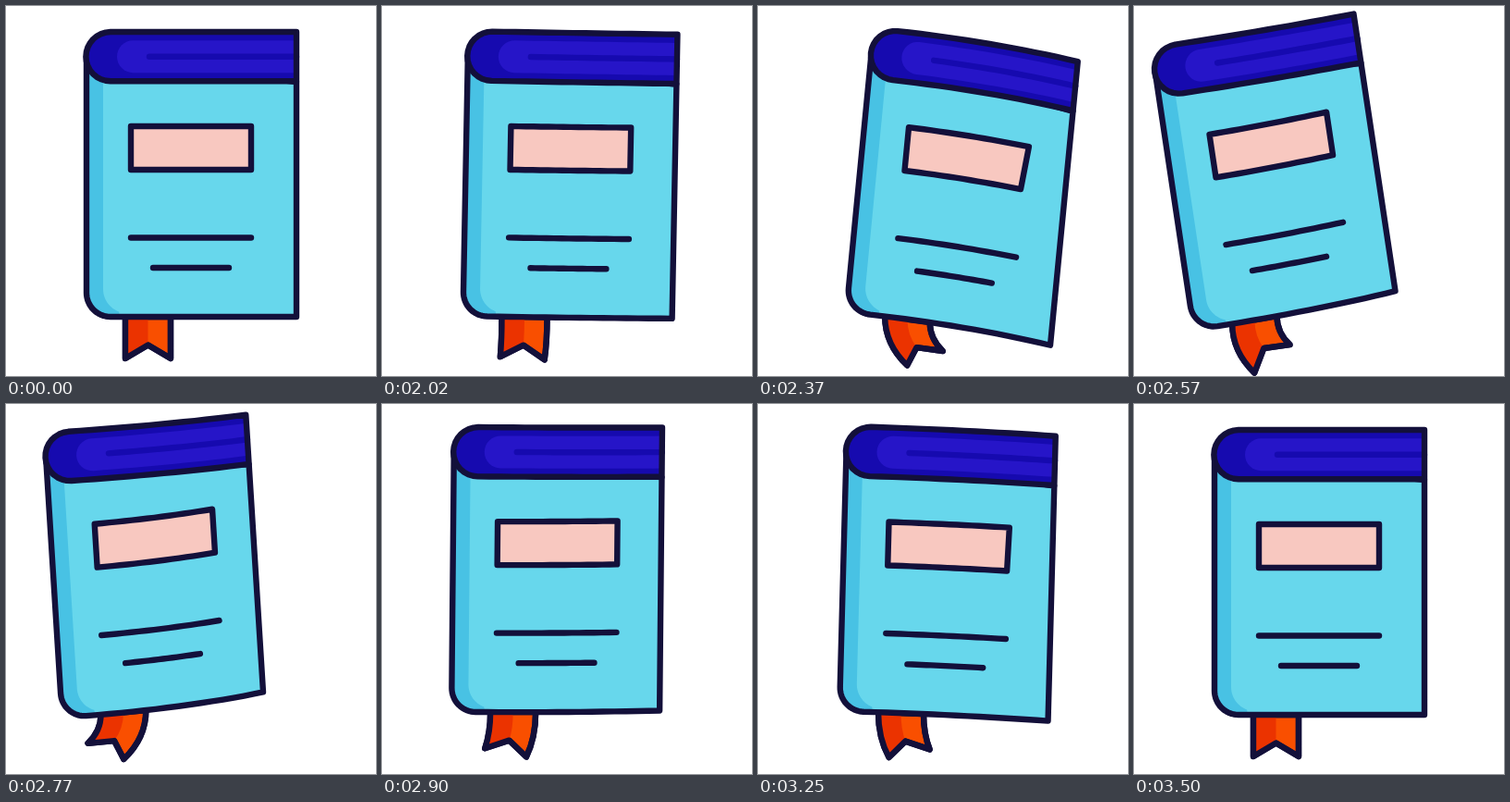
Write an HTML page with a canvas that moves like this. It is 400 by 400 pixels and loops after 3520 ms.

```html
<!DOCTYPE html>
<html lang="en">
<head>
<meta charset="utf-8">
<title>Swinging book</title>
<style>
  html, body { margin: 0; height: 100%; overflow: hidden; background: #fff; }
  canvas { display: block; width: 100vw; height: 100vh; }
</style>
</head>
<body>
<canvas id="stage" width="400" height="400"></canvas>
<script>
const ctx = document.getElementById('stage').getContext('2d');
const LOOP = 3520, START = 2020;
const INK = '#13103a';
const LEFT = 87, RIGHT = 314, WIDTH = RIGHT - LEFT, HINGE_Y = 310;

// Tracks of [time, value]; the anchor is the lower end of the left edge.
const tracks = {
  angle: [[1980, 0], [2220, 14], [2370, 5.6], [2600, -9], [2770, -3.6], [3030, 2.8], [3500, 0]],
  x: [[1980, 87], [2240, 102], [2370, 98], [2570, 61], [2660, 54], [2770, 59], [3050, 90], [3500, 87]],
  y: [[1980, 310], [2220, 298], [2370, 305], [2580, 324.5], [2770, 313], [3050, 303], [3500, 310]],
  bend: [[1980, 0], [2080, -4], [2220, 8], [2360, 14.5], [2570, -9], [2720, -14.5], [2770, -14], [3050, 8], [3500, 0]],
  flare: [[1980, 0], [2150, -0.8], [2370, 1], [2470, 1.1], [2570, 1], [2770, -1], [3050, 0.45], [3150, 0.6], [3500, 0]]
};

const slope = (a, b) => (b[1] - a[1]) / (b[0] - a[0]);

// Flat at peaks and ends, harmonic mean of neighbouring slopes elsewhere.
function tangent(keys, i) {
  if (i === 0 || i === keys.length - 1) return 0;
  const before = slope(keys[i - 1], keys[i]), after = slope(keys[i], keys[i + 1]);
  return before * after <= 0 ? 0 : 2 * before * after / (before + after);
}

function sample(keys, t) {
  const last = keys.length - 1;
  if (t < START) return keys[0][1];
  if (t >= keys[last][0]) return keys[last][1];
  const i = keys.findIndex(k => k[0] > t) - 1;
  const [t0, v0] = keys[i], [t1, v1] = keys[i + 1];
  const d = t1 - t0, s = (t - t0) / d, s2 = s * s, s3 = s2 * s;
  return v0 * (2 * s3 - 3 * s2 + 1) + v1 * (3 * s2 - 2 * s3)
    + d * (tangent(keys, i) * (s3 - 2 * s2 + s) + tangent(keys, i + 1) * (s3 - s2));
}

let pose;

// Bends a point of the resting book, then swings it about the anchor.
function warp([x, y]) {
  const { bend, angle } = pose, u = (x - LEFT) / WIDTH;
  const stiff = bend < 0 && y < 90 ? 0.45 : 1;
  const dx = x - LEFT - (bend > 0 ? 0.28 : 0.6) * Math.abs(bend) * u ** 6;
  const dy = y - HINGE_Y + bend * stiff * u * u;
  const a = angle * Math.PI / 180, c = Math.cos(a), s = Math.sin(a);
  return [pose.x + dx * c - dy * s, pose.y + dx * s + dy * c];
}

function arc(cx, cy, r, from, to) {
  return Array.from({ length: 17 }, (_, i) => {
    const a = (from + (to - from) * i / 16) * Math.PI / 180;
    return [cx + r * Math.cos(a), cy + r * Math.sin(a)];
  });
}

function paint(fill, stroke) {
  if (fill) { ctx.fillStyle = fill; ctx.fill(); }
  if (stroke) { ctx.strokeStyle = stroke; ctx.stroke(); }
}

// Long horizontal runs are split so that they can curve.
function shape(points, fill, stroke, closed = true) {
  ctx.beginPath();
  points.forEach(([x, y], i) => {
    const prev = points[i - 1];
    const steps = prev && Math.abs(prev[1] - y) < 0.01 ? 16 : 1;
    for (let n = 1; n <= steps; n++) {
      const px = prev ? prev[0] + (x - prev[0]) * n / steps : x;
      ctx.lineTo(...warp([px, y]));
    }
  });
  if (closed) ctx.closePath();
  paint(fill, stroke);
}

const line = (x0, x1, y, color = INK) => shape([[x0, y], [x1, y]], null, color, false);

function drawBookmark() {
  const k = pose.flare;
  const near = [24, 8], far = [14, -14];
  const [l, r] = k > 0 ? [near, far] : [far, near];
  const tip = (base, [dx, dy]) => [base[0] + dx * k, base[1] + 45 + dy * Math.abs(k)];
  const a = warp([129, 336]), b = warp([178, 336]), mid = warp([153.5, 336]);
  const tipA = tip(a, l), tipB = tip(b, r), notch = [mid[0] + 10 * k, mid[1] + 30.5];
  const curve = (from, to) =>
    ctx.quadraticCurveTo(from[0], from[1] + 0.57 * (to[1] - from[1]), ...to);

  ctx.beginPath();
  ctx.moveTo(...a);
  curve(a, tipA);
  ctx.lineTo(...notch);
  ctx.lineTo(...tipB);
  ctx.quadraticCurveTo(b[0], b[1] + 0.57 * (tipB[1] - b[1]), ...b);
  ctx.closePath();
  paint('#f94f00', INK);

  ctx.beginPath();
  ctx.moveTo(...mid);
  curve(mid, notch);
  ctx.lineTo(...tipA);
  ctx.quadraticCurveTo(a[0], a[1] + 0.57 * (tipA[1] - a[1]), ...a);
  ctx.closePath();
  paint('#eb3300');

  ctx.beginPath();
  ctx.moveTo(...a);
  curve(a, tipA);
  ctx.lineTo(...notch);
  ctx.lineTo(...tipB);
  ctx.quadraticCurveTo(b[0], b[1] + 0.57 * (tipB[1] - b[1]), ...b);
  paint(null, INK);
}

function drawCover() {
  const corner = arc(113, 310, 26, 180, 90);
  const cover = [[LEFT, 55], ...corner, [RIGHT, 336], [RIGHT, 82]];
  shape(cover, '#67d7ec');
  shape([[LEFT, 55], ...corner, [123, 336], ...arc(131, 306, 26, 110, 180), [105, 55]], '#48c2e4');
  shape(cover, null, INK);

  const lean = Math.max(pose.bend, 0) * 0.16;
  shape([[135, 130], [265 + lean, 130], [265 - lean, 177], [135, 177], [135, 130]], '#f8c8c0', INK);
  line(135, 265, 250.5);
  line(159, 241, 283);
}

function drawSpine() {
  const spine = [[RIGHT, 28], ...arc(113, 54.7, 26.6, -90, -270), [RIGHT, 81.3], [RIGHT, 28]];
  spine[1][1] = 28;
  spine[17][1] = 81.3;
  shape(spine, '#160aaf');
  const sheen = arc(137.5, 54.7, 17.5, -90, -270);
  shape([[RIGHT, sheen[0][1]], ...sheen, [RIGHT, sheen[16][1]]], '#2615c8');
  line(155, RIGHT, 54.7, '#160aaf');
  shape(spine, null, INK);
}

function render(t) {
  pose = {};
  for (const name in tracks) pose[name] = sample(tracks[name], t);
  ctx.clearRect(0, 0, 400, 400);
  ctx.lineWidth = 6.4;
  ctx.lineCap = ctx.lineJoin = 'round';
  drawBookmark();
  drawCover();
  drawSpine();
}

const begin = performance.now();
function frame() {
  render((performance.now() - begin) % LOOP);
  requestAnimationFrame(frame);
}
frame();
</script>
</body>
</html>
```
